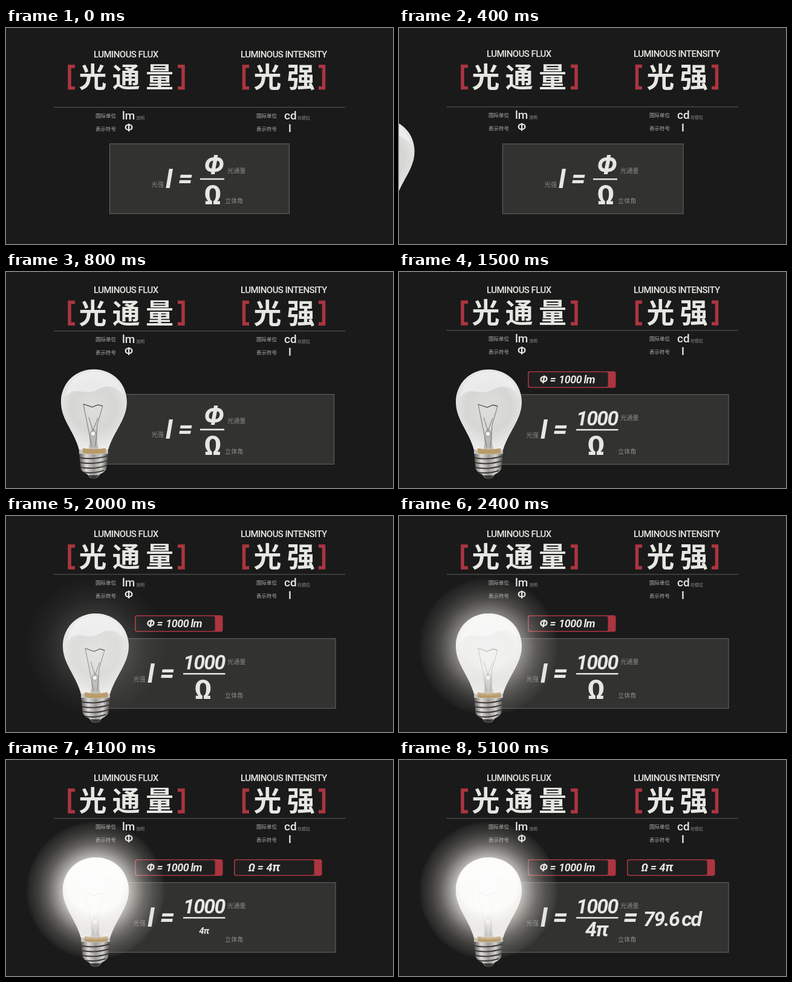
Animation of 640x359 px, one loop 5200 ms. Source, as an HTML page:

```html
<!DOCTYPE html>
<html lang="zh-CN">
<head>
<meta charset="utf-8">
<title>光通量与光强</title>
<style>
html, body { margin: 0; width: 100%; height: 100%; overflow: hidden; background: #1a1a1a; }
svg { display: block; width: 100vw; height: 100vh; }
text { font-family: Roboto, "Noto Sans CJK SC", "Noto Sans CJK", sans-serif; fill: #e6e6e2; }
.title { font-size: 15px; font-weight: 500; letter-spacing: -.58px; }
.big { font-size: 46px; font-weight: 700; letter-spacing: 9.2px; font-family: "Noto Sans CJK SC", "Noto Sans CJK", sans-serif; }
.key { font-size: 8.5px; font-weight: 500; fill: #b4b4b1; }
.unit { font-size: 19px; font-weight: 500; }
.small { font-size: 7px; font-weight: 500; fill: #92928f; }
.label { font-size: 10.2px; font-weight: 500; fill: #8b8b89; }
.sym { font-size: 44px; font-weight: 700; }
.it { font-style: italic; font-weight: 700; }
.num { font-size: 34px; letter-spacing: -1.8px; }
.tag { font-size: 18px; letter-spacing: -.5px; }
.mid { text-anchor: middle; }
.bracket { fill: none; stroke: #ab3540; stroke-width: 5.5; }
</style>
</head>
<body>
<svg viewBox="0 0 640 359" preserveAspectRatio="none">
  <defs>
    <path id="glass" d="M148 162C180 162 203 186 203 216C203 246 181 265 172 296Q148 301 124 296C116 265 94 246 94 216C94 186 117 162 148 162Z"/>
    <radialGradient id="dull" gradientUnits="userSpaceOnUse" cx="148" cy="226" r="68">
      <stop offset="0" stop-color="#dededd"/>
      <stop offset=".55" stop-color="#d6d6d5"/>
      <stop offset=".8" stop-color="#e2e2e1"/>
      <stop offset="1" stop-color="#ececeb"/>
    </radialGradient>
    <radialGradient id="lit" gradientUnits="userSpaceOnUse" cx="148" cy="207" r="92">
      <stop offset="0" stop-color="#fff"/>
      <stop offset=".5" stop-color="#fefefc"/>
      <stop offset=".66" stop-color="#f4f3f0" stop-opacity=".92"/>
      <stop offset="1" stop-color="#e9e7e2" stop-opacity=".3"/>
    </radialGradient>
    <radialGradient id="halo" gradientUnits="userSpaceOnUse" cx="148" cy="217" r="114">
      <stop offset=".44" stop-color="#f4f1ea" stop-opacity=".82"/>
      <stop offset=".56" stop-color="#eeebe4" stop-opacity=".6"/>
      <stop offset=".7" stop-color="#e2dfd8" stop-opacity=".36"/>
      <stop offset=".84" stop-color="#d6d3cc" stop-opacity=".19"/>
      <stop offset=".95" stop-color="#cfccc5" stop-opacity=".09"/>
      <stop offset="1" stop-color="#c8c5be" stop-opacity=".03"/>
    </radialGradient>
    <linearGradient id="metal">
      <stop offset="0" stop-color="#55544f"/>
      <stop offset=".25" stop-color="#dddcd8"/>
      <stop offset=".5" stop-color="#9a9995"/>
      <stop offset=".75" stop-color="#d2d1cd"/>
      <stop offset="1" stop-color="#4a4946"/>
    </linearGradient>
    <clipPath id="open1"><rect id="clip1" x="212" y="164" width="0" height="30"/></clipPath>
    <clipPath id="open2"><rect id="clip2" x="376" y="164" width="0" height="30"/></clipPath>
  </defs>

  <rect width="640" height="359" fill="#1a1a1a"/>
  <rect id="box" y="192.5" height="116" fill="#323231" stroke="#686866"/>

  <g id="titles">
    <text class="title" x="145" y="48.5">LUMINOUS FLUX</text>
    <text class="title" x="388" y="48.5">LUMINOUS INTENSITY</text>
    <text class="big" x="120.5" y="98">光通量</text>
    <text class="big" x="409.5" y="98">光强</text>
    <path class="bracket" d="M114 63.7H105V99.7H114M284 63.7H293V99.7H284M402 63.7H393.5V99.7H402M517 63.7H525.5V99.7H517"/>
  </g>

  <g id="units">
    <path d="M79 131.8H561" stroke="#5c5c5b"/>
    <text class="key" x="148" y="149">国际单位</text>
    <text class="unit" x="192" y="152">lm</text>
    <text class="small" x="215" y="151.5">流明</text>
    <text class="key" x="148" y="170.5">表示符号</text>
    <text class="unit mid" x="203" y="172">Φ</text>
    <text class="key" x="414" y="149">国际单位</text>
    <text class="unit" x="460" y="152">cd</text>
    <text class="small" x="482" y="151.5">坎德拉</text>
    <text class="key" x="414" y="170.5">表示符号</text>
    <text class="unit mid" x="469.5" y="172.5">I</text>
  </g>

  <g id="formula">
    <g id="lead">
      <text class="label" x="240.5" y="263.5">光强</text>
      <text class="sym it" x="263.5" y="266">I</text>
      <text class="sym it" x="284.5" y="265">=</text>
    </g>
    <path id="bar" stroke="#e6e6e2" stroke-width="2.6"/>
    <text class="label" id="fluxLabel" x="366" y="240.5">光通量</text>
    <text class="label" x="362" y="291">立体角</text>
    <g id="phi"><text class="sym it mid" x="344" y="243">Φ</text></g>
    <g id="flux"><text class="num it" x="293" y="244">1000</text></g>
    <g id="omega"><text class="sym mid" x="342" y="293">Ω</text></g>
    <g id="angle"><text class="num it" x="308" y="282">4π</text></g>
    <g id="result">
      <text class="sym it" x="370.5" y="265">=</text>
      <text class="num it" x="404" y="264.5">79.6<tspan dx="4">cd</tspan></text>
    </g>
  </g>

  <g id="tag1" clip-path="url(#open1)">
    <rect x="213" y="165" width="145.5" height="27.5" rx="3.5" fill="#ab3540"/>
    <rect x="214.6" y="166.6" width="131" height="24.3" rx="3" fill="#201f1f"/>
    <text class="tag it" x="232.5" y="185">Φ = <tspan dx="1.5">1000</tspan><tspan dx="3">lm</tspan></text>
  </g>
  <g id="tag2" clip-path="url(#open2)">
    <rect x="377" y="165" width="145.5" height="27.5" rx="3.5" fill="#ab3540"/>
    <rect x="378.6" y="166.6" width="131" height="24.3" rx="3" fill="#201f1f"/>
    <text class="tag it" x="400.5" y="185">Ω = <tspan dx="1.5">4</tspan><tspan font-size="21">π</tspan></text>
  </g>

  <circle id="glow" cx="148" cy="217" r="114" fill="url(#halo)"/>
  <g id="bulb">
    <path d="M124 300H172L169 328Q165 334 159 336L154 342Q148 345 142 342L137 336Q131 334 127 328Z" fill="url(#metal)"/>
    <path d="M125 309Q148 313 171 306M126 317Q148 321 170 314M127 325Q148 329 169 322M131 333Q148 336 165 330" fill="none" stroke="#3a3936" stroke-width="2"/>
    <path d="M139 338H157L153 342Q148 345 143 342Z" fill="#3c3b39"/>
    <use href="#glass" fill="url(#dull)"/>
    <path d="M101 208C116 188 134 207 154 196S188 192 197 205C190 177 170 166 148 166S106 179 101 208Z" fill="#f1f1f0" opacity=".75"/>
    <path d="M140 294C143 280 139 274 143 264Q148 258 153 264C156 274 152 280 156 294Z" fill="#b9b9b7"/>
    <circle cx="147" cy="269" r="4" fill="#f4f4f3" stroke="#8f8f8d"/>
    <path d="M131 220L139 260L145 291M163 223L154 254L151 291M140 242L147 264L155 243" fill="none" stroke="#777573"/>
    <path d="M131 220L146 225L155 221L163 223" fill="none" stroke="#4c4a48" stroke-width="1.3"/>
    <path d="M124 295Q148 299 172 295V302Q148 305 124 302Z" fill="#c4c2bc"/>
    <path d="M130 293Q148 296 168 293V301Q148 304 130 301Z" fill="#b99a68"/>
    <use id="light" href="#glass" fill="url(#lit)"/>
  </g>
</svg>

<script>
const LOOP = 5200, STEP = 100;
const $ = id => document.getElementById(id);
const set = (id, attrs) => {
  for (const k in attrs) $(id).setAttribute(k, attrs[k]);
};
const span = (t, a, b) => Math.min(1, Math.max(0, (t - a) / (b - a)));
const mix = (a, b, k) => a + (b - a) * k;
const inOut = (p, n) => p < .5 ? (2 * p) ** n / 2 : 1 - (2 - 2 * p) ** n / 2;
const out = (p, n) => 1 - (1 - p) ** n;
const move = (id, x, y) => set(id, { transform: `translate(${x} ${y})` });
const zoom = (id, x, y, k) => set(id, {
  transform: `translate(${x} ${y}) scale(${k}) translate(${-x} ${-y})`,
  visibility: k > .01 ? 'visible' : 'hidden'
});

function draw(t) {
  // Headings rise while the panel widens and the bulb slides in.
  const p = span(t, 228, 990), k = inOut(p, 4), drop = 11.2 * k;
  move('titles', 0, -13.8 * k);
  move('units', 0, -34.8 * k);
  const left = mix(171.5, 165.5, k), right = mix(468.5, 545, k);
  set('box', { x: left, width: right - left, transform: `translate(0 ${drop})` });
  move('bulb', -442 * (1 - p) ** 3.57, drop - 11.2);
  move('formula', 0, drop);

  // Flux value replaces its symbol.
  set('clip1', { width: 148 * out(span(t, 950, 1300), 3) });
  const s = inOut(span(t, 1050, 1450), 3);
  move('lead', -30 * s, 0);
  move('omega', -16 * s, 0);
  move('fluxLabel', 0, -6 * s);
  set('bar', { d: `M${mix(321, 293, s)} 251H${mix(361, 362.5, s)}` });
  zoom('phi', 344, 228, 1 - span(t, 1050, 1250));
  zoom('flux', 328, 232, out(span(t, 1200, 1450), 3));

  // The bulb lights up.
  const glow = inOut(span(t, 1600, 2950), 2);
  set('glow', { opacity: glow });
  set('light', { opacity: glow * .93 });

  // Solid angle, then the result.
  set('clip2', { width: 148 * out(span(t, 2550, 2950), 3) });
  set('omega', { opacity: 1 - span(t, 3800, 4050) });
  zoom('angle', 328, 275, inOut(span(t, 3950, 4270), 2));
  const r = out(span(t, 4350, 4750), 3);
  move('result', -14 * (1 - r), 0);
  set('result', { opacity: r });
}

const start = performance.now();
function tick(now) {
  const t = Math.max(0, now - start) % LOOP;
  draw(Math.floor(t / STEP) * STEP);
  requestAnimationFrame(tick);
}
draw(0);
requestAnimationFrame(tick);
</script>
</body>
</html>
```
